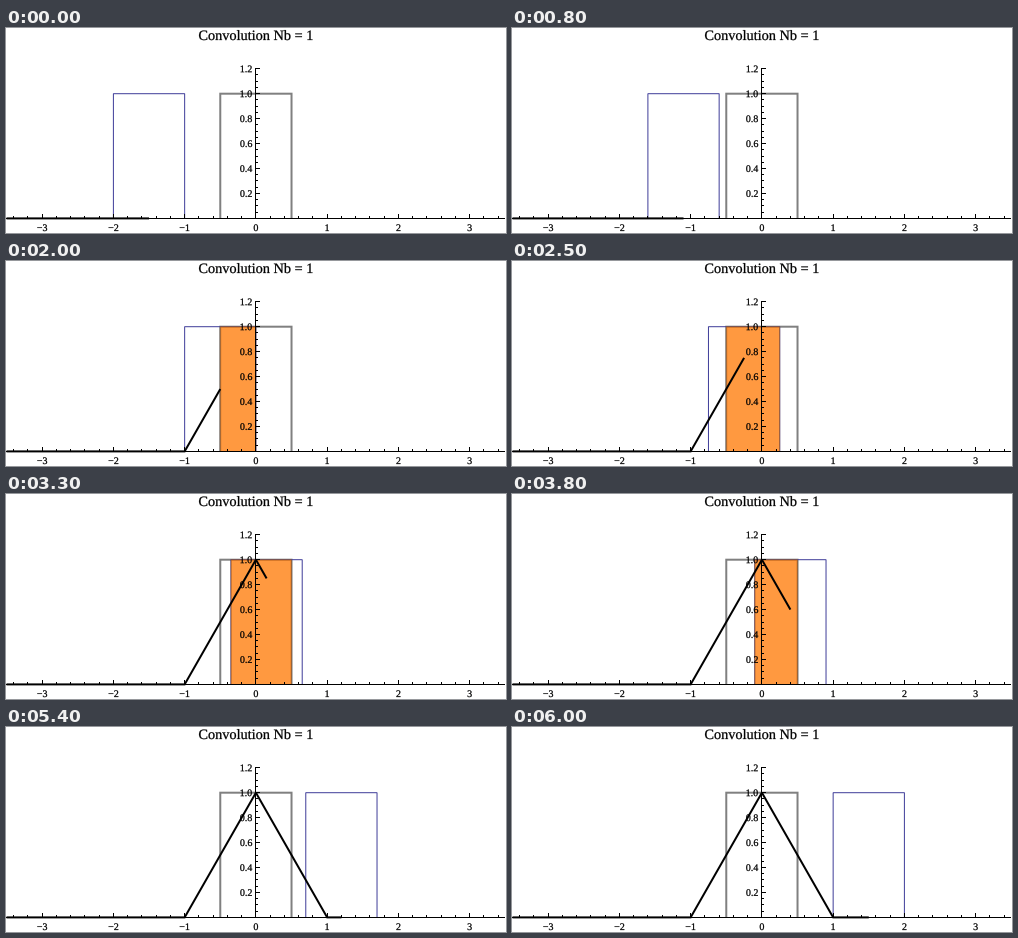
A matplotlib script that plays this animation: 500 by 205 pixels, repeating every 6100 ms.

```python
import matplotlib.pyplot as plt
import numpy as np
from matplotlib.animation import FuncAnimation
from matplotlib.patches import Rectangle
from matplotlib.patheffects import Stroke

W, H, DPI = 500, 205, 80
FRAMES, STEP_MS = 61, 100
X0, Y0 = 249.9, 190.4        # pixel position of the plot origin
UX, UY = 71.25, 124.7        # pixels per unit

BLUE = (0.247, 0.239, 0.6)
GRAY = (0.5, 0.5, 0.5)
ORANGE = (1.0, 0.467, 0.0)
EDGE = (0.5, 0.33, 0.2)

plt.rcParams["font.family"] = "Liberation Serif"


def px(x):
    return X0 + UX * np.asarray(x, dtype=float)


def py(y):
    return Y0 - UY * np.asarray(y, dtype=float)


def pt(pixels):
    return pixels * 72 / DPI


fig = plt.figure(figsize=(W / DPI, H / DPI), dpi=DPI, facecolor="white")
ax = fig.add_axes([0, 0, 1, 1])
ax.set_xlim(0, W)
ax.set_ylim(H, 0)
ax.axis("off")


def stroke(xs, ys, color, width, z, **kw):
    line, = ax.plot(xs, ys, color=color, lw=pt(width), zorder=z, snap=False,
                    solid_capstyle="butt", solid_joinstyle="miter", **kw)
    return line


def hline(x, y, length):
    """Crisp one-pixel row, starting in the pixel that holds (x, y)."""
    x, y = np.floor(x), np.floor(y) + 0.5
    stroke([x, x + length], [y, y], "black", 1, 6)


def vline(x, y, length):
    """Crisp one-pixel column, rising from the pixel that holds (x, y)."""
    x, y = np.floor(x) + 0.5, np.floor(y) + 1
    stroke([x, x], [y, y - length], "black", 1, 6)


def label(x, y, text, size, align):
    # a faint outline gives the slightly heavier letters
    ax.text(x, y, text, fontsize=pt(size), ha=align, va="baseline",
            color="black", zorder=7,
            path_effects=[Stroke(linewidth=pt(0.25), foreground="black")])


def box_path(left, right):
    return px([left, left, right, right]), py([0, 1, 1, 0])


def draw_axes():
    hline(0, Y0, W - 1)
    vline(X0, Y0, np.floor(Y0) - np.floor(py(1.2)) + 1)
    for k in range(-17, 18):
        x = px(k / 5)
        major = k % 5 == 0
        vline(x, Y0, 5 if major else 3)
        if major:
            label(x, 203, str(k // 5).replace("-", "\u2212"), 10, "center")
    for k in range(1, 25):
        y = py(k / 20)
        major = k % 4 == 0
        hline(X0, y, 5 if major else 3)
        if major:
            label(246.3, y + 3.4, f"{k / 20:.1f}", 10, "right")


draw_axes()
label(249.5, 12, "Convolution Nb = 1", 14.3, "center")
stroke(*box_path(-0.5, 0.5), GRAY, 2, 1)

moving = stroke([], [], BLUE, 1, 2)
overlap = Rectangle((0, py(1)), 0, UY, facecolor=ORANGE, alpha=0.75,
                    linewidth=0, zorder=3, snap=False)
ax.add_patch(overlap)
outline = stroke([], [], EDGE, 1, 4, alpha=0.6)
result = stroke([], [], "black", 2, 5)


def update(i):
    c = -1.5 + 0.05 * i
    moving.set_data(*box_path(c - 0.5, c + 0.5))

    left, right = max(-0.5, c - 0.5), min(0.5, c + 0.5)
    shown = right - left > 1e-6
    overlap.set_visible(shown)
    outline.set_visible(shown)
    if shown:
        overlap.set_x(px(left))
        overlap.set_width(UX * (right - left))
        outline.set_data(*box_path(left, right))

    xs = np.array([-3.5] + [k for k in (-1, 0, 1) if k < c - 1e-6] + [c])
    result.set_data(px(xs), py(np.maximum(0, 1 - np.abs(xs))))
    return moving, overlap, outline, result


def start():
    return update(0)


anim = FuncAnimation(fig, update, frames=FRAMES, init_func=start,
                     interval=STEP_MS, repeat=True, blit=False)
plt.show()
```
